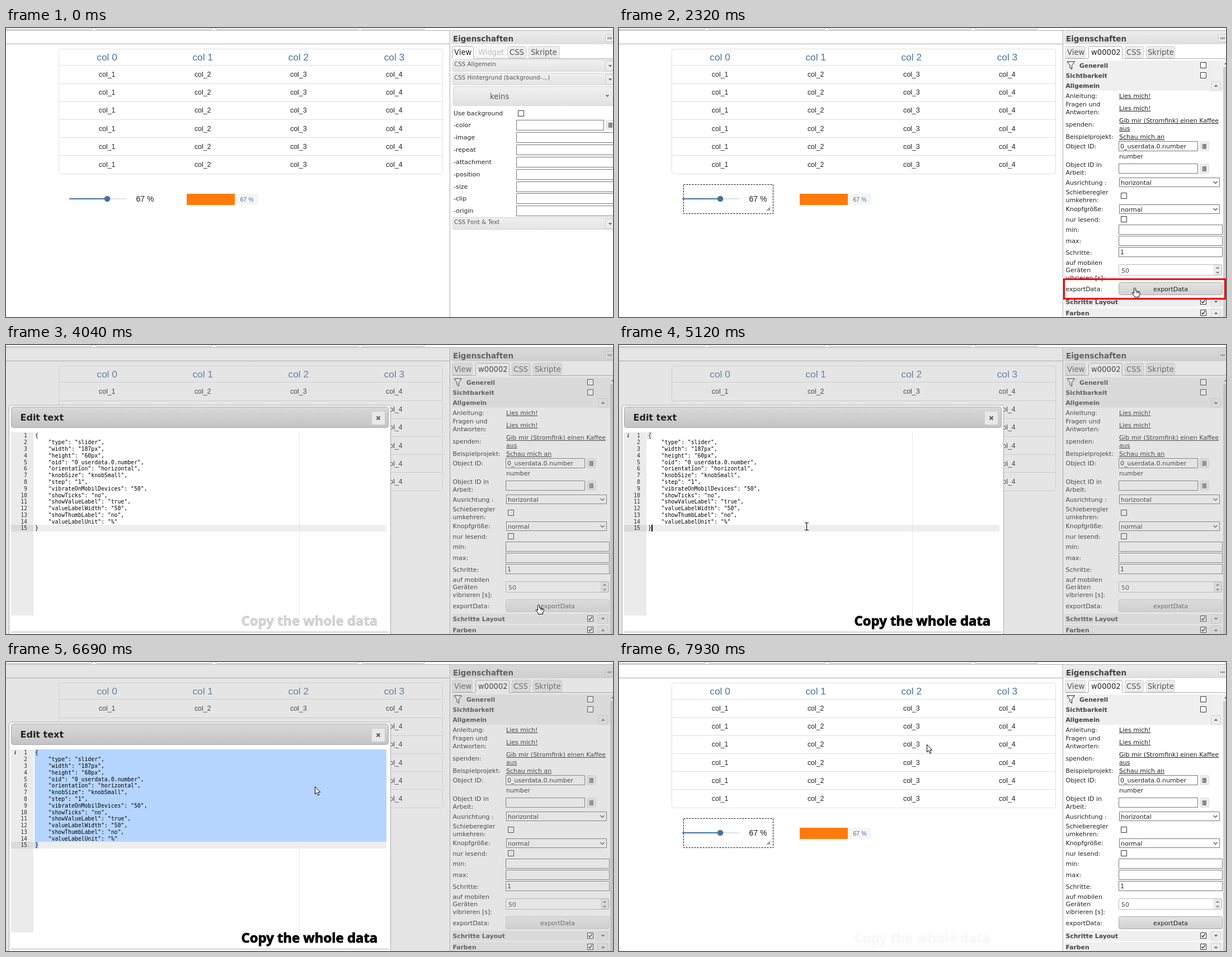
These frames come from a looping animation (1085x516 px, 8000 ms). An HTML page with a canvas:

```html
<!DOCTYPE html>
<html lang="de">
<head>
<meta charset="utf-8">
<title>Widget export</title>
<style>
html, body { margin: 0; width: 100%; height: 100%; overflow: hidden; background: #fff; }
canvas { display: block; }
</style>
</head>
<body>
<canvas id="stage" width="1085" height="516"></canvas>
<script>
const ctx = document.getElementById('stage').getContext('2d', { alpha: false });
const LOOP = 8000;
const UI = '"DejaVu Sans", sans-serif';
const ARIAL = '"Liberation Sans", sans-serif';
const MONO = '"DejaVu Sans Mono", monospace';
const BLUE = '#44739e';

// ---- helpers ----
function text(str, x, y, font = '11px ' + UI, color = '#222', align = 'left') {
  ctx.font = font;
  ctx.fillStyle = color;
  ctx.textAlign = align;
  ctx.fillText(str, x, y);
}
function fill(x, y, w, h, color) {
  ctx.fillStyle = color;
  ctx.fillRect(x, y, w, h);
}
function box(x, y, w, h, bg, border, r = 0) {
  ctx.beginPath();
  ctx.roundRect(x + .5, y + .5, w - 1, h - 1, r);
  if (bg) { ctx.fillStyle = bg; ctx.fill(); }
  ctx.strokeStyle = border;
  ctx.lineWidth = 1;
  ctx.stroke();
}
function grad(y, h, top, bottom) {
  const g = ctx.createLinearGradient(0, y, 0, y + h);
  g.addColorStop(0, top);
  g.addColorStop(1, bottom);
  return g;
}
function poly(points, color, stroke) {
  ctx.beginPath();
  for (let i = 0; i < points.length; i += 2) ctx.lineTo(points[i], points[i + 1]);
  ctx.closePath();
  ctx.fillStyle = color;
  ctx.fill();
  if (stroke) { ctx.strokeStyle = stroke; ctx.lineWidth = 1; ctx.stroke(); }
}
function triangle(x, y, dir) {
  poly([x - 3.5, y - 2 * dir, x + 3.5, y - 2 * dir, x, y + 2 * dir], '#777');
}
function line(points, color, width = 1) {
  ctx.beginPath();
  for (let i = 0; i < points.length; i += 2) ctx.lineTo(points[i], points[i + 1]);
  ctx.strokeStyle = color;
  ctx.lineWidth = width;
  ctx.stroke();
}
function checkbox(x, y, checked) {
  box(x, y, 11, 11, '#fff', '#333');
  if (checked) line([x + 2.5, y + 5.5, x + 4.5, y + 8, x + 8.5, y + 2.5], '#222', 1.3);
}
function field(x, y, w, h, value = '') {
  box(x, y, w, h, '#fff', '#767676');
  text(value, x + 3, y + h / 2 + 4);
}
function idButton(x, y) {
  box(x, y, 17, 18, '#eee', '#e0e0e0', 2);
  fill(x + 4, y + 5, 8, 9, '#888');
  fill(x + 4, y + 5, 2, 9, '#aaa');
}
function select(y, value) {
  field(894, y, 180, 17, value);
  line([1062.5, y + 7, 1066, y + 10.5, 1069.5, y + 7], '#444', 1.2);
}
function link(str, y) {
  text(str, 894, y);
  fill(894, y + 1, ctx.measureText(str).width, 1, '#222');
}

// ---- page ----
function drawCanvasArea(selected) {
  let left = -6;
  for (const right of [155, 370, 631, 749]) {
    box(left, -8, right - left, 11, '#fff', '#aaa', 3);
    left = right + 4;
  }
  fill(0, 4, 1085, 1, '#aaa');
  fill(0, 28, 794, 1, '#aaa');

  box(94, 37, 687, 224, '#fff', '#e0e0e0', 4);
  for (let c = 0; c < 4; c++) {
    const x = 180.6 + c * 171.1;
    text('col ' + c, x, 58, '17.3px ' + ARIAL, BLUE, 'center');
    for (let r = 0; r < 6; r++) {
      text('col_' + (c + 1), x, 87 + r * 32.2, '12.4px ' + ARIAL, '#212121', 'center');
    }
  }
  for (let r = 0; r < 6; r++) fill(95, Math.round(66.4 + r * 32.2), 685, 1, '#dedede');

  fill(181, 304, 34, 2, '#dde1e5');
  fill(113, 304, 68, 2, BLUE);
  ctx.beginPath();
  ctx.arc(181, 305, 5.3, 0, 7);
  ctx.fillStyle = BLUE;
  ctx.fill();
  text('67 %', 232.5, 310, '14px ' + ARIAL, '#212121');

  fill(323, 296, 128, 20, '#f5f5f5');
  fill(323, 296, 86, 20, '#ff7a09');
  text('67 %', 430.5, 310, '10.5px ' + ARIAL, BLUE, 'center');

  if (selected) {
    ctx.setLineDash([3, 2]);
    box(115, 279, 161, 53, null, '#000');
    ctx.setLineDash([]);
    for (let i = 1; i < 4; i++) line([270 - 2 * i, 326, 270, 326 - 2 * i], '#444');
  }
}

function drawTabs(tabs, active, disabled) {
  fill(797, 54, 288, 1, '#aaa');
  tabs.forEach(([name, x, w, tx], i) => {
    const on = i === active;
    ctx.globalAlpha = i === disabled ? .35 : 1;
    box(x, 32, w, on ? 26 : 22, on ? '#fff' : '#ececec', on ? '#aaa' : '#d3d3d3', 3);
    if (on) fill(x - 1, 54, w + 2, 5, '#fff');
    if (on) { fill(x - 1, 54, 1, 1, '#aaa'); fill(x + w, 54, 1, 1, '#aaa'); }
    text(name, tx, 48, '13.2px ' + UI, on ? '#212121' : '#555');
    ctx.globalAlpha = 1;
  });
}

function drawPanelFrame() {
  fill(794, 5, 291, 511, '#fff');
  fill(793, 5, 1, 511, '#aaa');
  box(796, 6, 300, 23, grad(6, 23, '#ededed', '#dedede'), '#ddd', 3);
  text('Eigenschaften', 799, 24, 'bold 13.5px ' + UI, '#444');
  box(1071, 11, 20, 14, '#eee', '#ccc', 2);
  fill(1075, 16, 8, 4, '#999');
  fill(1076, 17, 6, 1, '#eee');
}

function drawViewPanel() {
  drawTabs([['View', 797, 39, 801], ['Widget', 839, 54, 844], ['CSS', 896, 35, 900], ['Skripte', 934, 56, 938]], 0, 1);
  const accordion = (label, y) => {
    box(798, y, 300, 22, grad(y, 22, '#f0f0f0', '#e3e3e3'), '#d3d3d3', 2);
    text(label, 801, y + 12, '10.3px ' + UI, '#555');
    box(1071, y + 2, 20, 19, '#ececec', '#ccc', 2);
    triangle(1080, y + 12, 1);
  };
  accordion('CSS Allgemein', 56);
  accordion('CSS Hintergrund (background-...)', 80);
  box(799, 104, 300, 35, grad(104, 35, '#f0f0f0', '#e2e2e2'), '#d3d3d3', 3);
  text('keins', 865, 127, '13.3px ' + UI, '#555');
  triangle(1075, 121.5, 1);
  text('Use background', 800, 156, '10.9px ' + UI);
  checkbox(915, 147);
  ['color', 'image', 'repeat', 'attachment', 'position', 'size', 'clip', 'origin'].forEach((name, i) => {
    const y = 173 + i * 21.9;
    text('-' + name, 800, Math.round(y + 4));
    field(912, Math.round(y - 9), i ? 180 : 157, 19);
  });
  idButton(1072, 164);
  accordion('CSS Font & Text', 338);
}

function drawWidgetPanel(buttonState) {
  drawTabs([['View', 797, 37, 801], ['w00002', 839, 61, 844], ['CSS', 904, 34, 907], ['Skripte', 942, 52, 945]], 1);
  const heading = (label, x, y, check, dir) => {
    fill(797, y - 9, 283, 18, '#efefef');
    text(label, x, y + 4, 'bold 10.8px ' + UI, '#444');
    if (check !== undefined) checkbox(1039, y - 6, check);
    if (dir) {
      box(1058, y - 8, 18, 17, '#ececec', '#d3d3d3', 2);
      triangle(1067, y, dir);
    }
  };
  heading('Generell', 823, 67, false);
  heading('Sichtbarkeit', 798.5, 85, false);
  heading('Allgemein', 798.5, 103, undefined, -1);
  heading('Schritte Layout', 798.5, 489, true, 1);
  heading('Farben', 798.5, 509, true, -1);
  poly([801, 60, 814.5, 60, 809.5, 66.5, 809.5, 73.5, 806, 71, 806, 66.5], '#fff', '#111');

  [['Anleitung:', 121], ['Fragen und', 136], ['Antworten:', 150], ['spenden:', 172], ['Beispielprojekt:', 194],
   ['Object ID:', 211], ['Object ID in', 244], ['Arbeit:', 258], ['Ausrichtung :', 276], ['Schieberegler', 293],
   ['umkehren:', 307], ['Knopfgröße:', 323], ['nur lesend:', 342], ['min:', 360], ['max:', 380], ['Schritte:', 401],
   ['auf mobilen', 419], ['Geräten', 432], ['vibrieren [s]:', 446], ['exportData:', 466]
  ].forEach(([label, y]) => text(label, 798.5, y + 4));

  link('Lies mich!', 125);
  link('Lies mich!', 147);
  link('Gib mir (Stromfink) einen Kaffee', 169);
  link('aus', 183);
  link('Schau mich an', 198);
  field(893, 202, 142, 18, '0_userdata.0.number');
  idButton(1038, 202);
  text('number', 894, 233);
  field(893, 242, 142, 18);
  idButton(1038, 242);
  select(267, 'horizontal');
  checkbox(897, 294);
  select(315, 'normal');
  checkbox(897, 336);
  field(893, 351, 186, 18);
  field(893, 371, 186, 18);
  field(893, 391, 186, 18, '1');
  box(893, 422, 185, 20, '#fff', '#bbb', 2);
  text('50', 898, 437, '11px ' + UI, '#444');
  box(1063, 423, 14, 18, '#ededed', '#ddd');
  triangle(1070, 428, -.8);
  triangle(1070, 437, .8);

  const [top, bottom, border, ink] = {
    normal: ['#f0f0f0', '#e0e0e0', '#d3d3d3', '#555'],
    hover: ['#e4e4e4', '#d0d0d0', '#aaa', '#212121'],
    active: ['#fff', '#f5f5f5', '#aaa', '#212121']
  }[buttonState];
  box(893, 454, 186, 23, grad(454, 23, top, bottom), border, 3);
  text('exportData', 986, 470, '11px ' + UI, ink, 'center');

  fill(1080, 56, 5, 460, '#f0f0f0');
  fill(1080, 70, 5, 446, '#cdcdcd');
  poly([1082, 65, 1085, 61.5, 1088, 65], '#555');
}

// ---- dialog ----
const CODE = `{
    "type": "slider",
    "width": "187px",
    "height": "60px",
    "oid": "0_userdata.0.number",
    "orientation": "horizontal",
    "knobSize": "knobSmall",
    "step": "1",
    "vibrateOnMobilDevices": "50",
    "showTicks": "no",
    "showValueLabel": "true",
    "valueLabelWidth": "50",
    "showThumbLabel": "no",
    "valueLabelUnit": "%"
}`.split('\n');

function drawDialog(t) {
  ctx.fillStyle = 'rgba(170,170,170,.3)';
  ctx.fillRect(0, 5, 1085, 511);
  box(5, 107, 683, 430, '#fff', '#aaa', 4);
  box(9, 110, 675, 38, grad(110, 38, '#d9d9d9', '#c3c3c3'), '#aaa', 4);
  text('Edit text', 25.5, 135, 'bold 16px ' + UI, '#222');
  const hover = t >= 7300;
  box(653, 118, 25, 25, t >= 7620 ? '#fff' : hover ? '#dadada' : '#e8e8e8', hover ? '#999' : '#d0d0d0', 3);
  line([662.5, 127.5, 668.5, 133.5], '#555', 2);
  line([668.5, 127.5, 662.5, 133.5], '#555', 2);

  const selected = t >= 5440, settled = t >= 4700;
  fill(9, 156, 40, 327, '#ebebeb');
  fill(9, 321, 40, 12, '#dadada');
  fill(49, 321, 631, 12, '#eee');
  fill(524, 156, 1, 327, '#e8e8e8');
  if (selected) {
    fill(51, 156, 629, 165, '#b5d5ff');
    fill(51, 321, 7, 12, '#b5d5ff');
  } else if (settled) {
    box(51, 156, 7, 12, null, '#c0c0c0');
  }
  if (settled) text('i', 15, 165, 'italic bold 10px "Liberation Serif", serif', '#222');
  CODE.forEach((row, i) => {
    const y = Math.round(165.4 + i * 11.79);
    text(i + 1, 38, y, '9.8px ' + MONO, '#333', 'right');
    text(row, 52, y, '9.8px ' + MONO, '#000');
  });
  const caretOn = (t >= 4880 && t < 5590) || (t >= 6060 && t < 6520) || (t >= 6990 && t < 7620);
  if (caretOn) fill(58, 321, 2, 12, '#000');
  fill(9, 512, 675, 1, '#aaa');
}

function drawCaption(alpha) {
  ctx.globalAlpha = alpha;
  const font = 'bold 23.9px "Open Sans", "Noto Sans", sans-serif';
  text('Copy the whole data', 420.5, 501, font, '#000');
  ctx.strokeStyle = '#000';
  ctx.lineWidth = .9;
  ctx.strokeText('Copy the whole data', 420.5, 501);
  ctx.globalAlpha = 1;
}

// ---- pointer ----
const PATH = [
  [300, 820, 484], [840, 229, 314], [990, 225, 312], [1120, 207, 305], [1930, 207, 305], [2320, 922, 465],
  [2710, 913, 463], [2790, 920, 464], [3100, 968, 471], [3400, 955, 465], [4040, 955, 465], [4270, 374, 387],
  [4420, 372, 384], [4880, 335, 324], [6520, 335, 324], [6690, 552, 222], [7150, 674, 138], [7470, 667, 128],
  [7740, 667, 128], [7930, 550, 147]
];
function pointerAt(t) {
  const i = PATH.findIndex(p => p[0] > t);
  if (i < 0) return PATH.at(-1).slice(1);
  const [t0, x0, y0] = PATH[i - 1], [t1, x1, y1] = PATH[i];
  const k = (t - t0) / (t1 - t0);
  return [x0 + (x1 - x0) * k, y0 + (y1 - y0) * k];
}
const shapes = {
  arrow() {
    poly([.5, .5, .5, 14, 3.5, 11.2, 5.6, 16, 7.8, 15, 5.7, 10.4, 9.8, 10.4], '#fff', '#000');
  },
  move() {
    for (let i = 0; i < 4; i++) {
      line([0, 0, 0, -8], '#000', 1.2);
      poly([-3, -7, 0, -10, 3, -7], '#000');
      ctx.rotate(Math.PI / 2);
    }
  },
  ibeam() {
    line([-3, -6.5, 4, -6.5], '#000');
    line([.5, -6, .5, 6], '#000');
    line([-3, 6.5, 4, 6.5], '#000');
  },
  hand() {
    ctx.lineJoin = 'round';
    poly([-1.5, 0, 0, -1.2, 1.5, 0, 1.5, 4.5, 4, 4.8, 6.5, 5.5, 9, 6.5, 9.3, 10, 7.5, 13, 7.5, 15.5,
          -.5, 15.5, -1, 13.5, -5, 8.5, -4, 7, -1.5, 9], '#fff', '#000');
    line([4, 5, 4, 9], '#000');
    line([6.5, 6, 6.5, 9], '#000');
    ctx.lineJoin = 'miter';
  }
};
function drawPointer(t) {
  if (t < 300) return;
  const [x, y] = pointerAt(t);
  let shape = 'arrow';
  if (t >= 1060 && t < 1300) shape = 'move';
  else if (t >= 2300 && t < 4080) shape = 'hand';
  else if (t >= 4250 && t < 6540) shape = 'ibeam';
  ctx.save();
  ctx.translate(Math.round(x), Math.round(y));
  shapes[shape]();
  ctx.restore();
}

function buttonStateAt(t) {
  if (t >= 3840 && t < 4040) return 'active';
  return t >= 7770 || (t >= 2300 && t < 4040) ? 'hover' : 'normal';
}

function draw(t) {
  fill(0, 0, 1085, 516, '#fff');
  const selected = t >= 1530;
  drawCanvasArea(selected);
  drawPanelFrame();
  if (selected) drawWidgetPanel(buttonStateAt(t));
  else drawViewPanel();
  if (t >= 2160 && t < 4040) {
    ctx.strokeStyle = '#f00';
    ctx.lineWidth = 3;
    ctx.strokeRect(795.5, 448.5, 288, 35);
  }
  if (t >= 4040 && t < 7770) drawDialog(t);
  const fade = Math.min((t - 4000) / 270, (7935 - t) / 165, 1);
  if (fade > 0) drawCaption(fade);
  drawPointer(t);
}

function tick() {
  draw(performance.now() % LOOP);
  requestAnimationFrame(tick);
}
tick();
</script>
</body>
</html>
```
